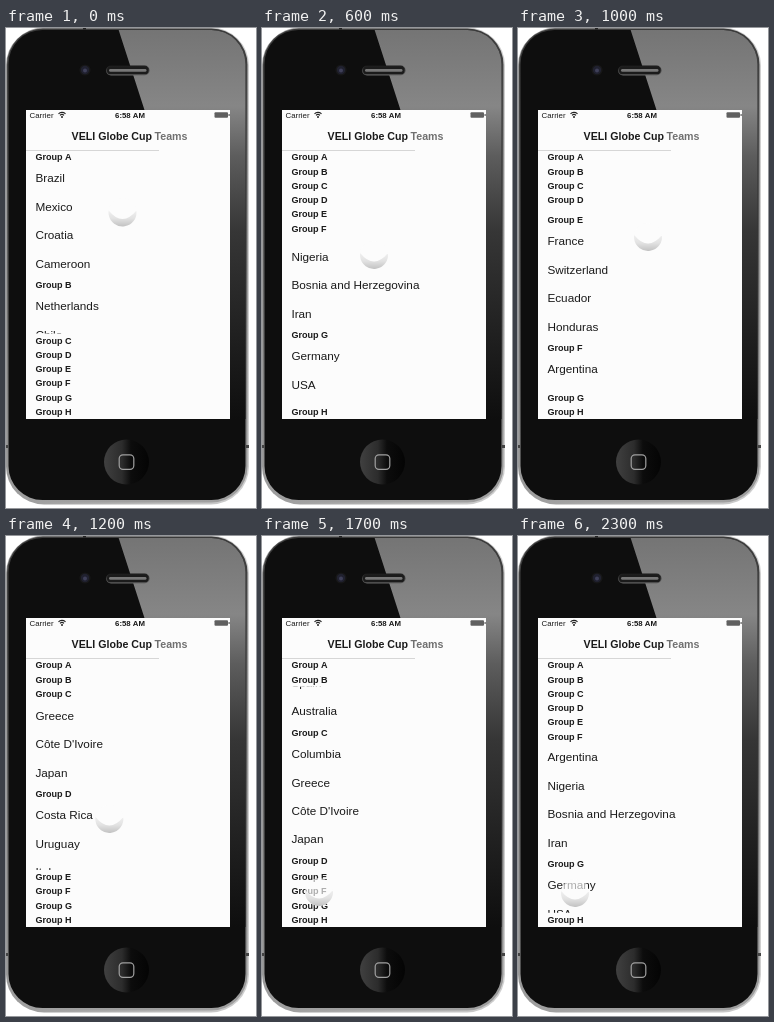
These frames come from a looping animation (250 px wide and 480 px high, 2400 ms). An HTML page with a canvas:

```html
<!DOCTYPE html>
<html lang="en">
<head>
<meta charset="utf-8">
<title>Sticky group list</title>
<style>
  html, body { margin: 0; width: 100%; height: 100%; overflow: hidden; background: #fff; }
  canvas { display: block; width: 250px; height: 480px; }
</style>
</head>
<body>
<canvas id="stage"></canvas>
<script>
const W = 250, H = 480, LOOP = 2400, STEP = 100;
const SCREEN = { x: 20, y: 82, w: 204, h: 309 };
const LIST_TOP = 122.3, HEAD = 14.25, ROW = 28.44, SECTION = 128;
const BOTTOM = SCREEN.y + SCREEN.h;
const PAPER = '#fcfcfc', INK = '#1a1a1a', BODY = '#0e0e0e';
const FONT = '"Liberation Sans", Arial, sans-serif';

const groups = [
  ['Brazil', 'Mexico', 'Croatia', 'Cameroon'],
  ['Netherlands', 'Chile', 'Spain', 'Australia'],
  ['Columbia', 'Greece', "Côte D'Ivoire", 'Japan'],
  ['Costa Rica', 'Uruguay', 'Italy', 'England'],
  ['France', 'Switzerland', 'Ecuador', 'Honduras'],
  ['Argentina', 'Nigeria', 'Bosnia and Herzegovina', 'Iran'],
  ['Germany', 'USA', 'Portugal', 'Ghana'],
  ['Belgium', 'Algeria', 'Russia', 'Korea Republic']
];

// [time, scroll offset]
const scrollKeys = [
  [0, 0], [100, 15], [200, 65], [300, 135], [400, 213.4], [500, 390], [600, 590],
  [700, 720], [800, 758], [900, 630], [1000, 449], [1100, 330], [1200, 255],
  [1300, 220], [1400, 205.4], [1700, 188.4], [1800, 200], [1900, 400],
  [2000, 545], [2100, 545], [2200, 563], [2300, 569]
];
// [time, x, y] of the touch dot
const touchKeys = [
  [0, 116.5, 184.5], [400, 99.5, 244.5], [800, 124.5, 209.5], [1000, 130, 209],
  [1300, 90, 320], [1400, 75, 353], [1700, 57, 356], [2300, 57, 357]
];
const presses = [[300, 600], [1800, 2000]];

const canvas = document.getElementById('stage');
const ratio = window.devicePixelRatio || 1;
canvas.width = W * ratio;
canvas.height = H * ratio;
const ctx = canvas.getContext('2d');
ctx.scale(ratio, ratio);

function sample(keys, t, col) {
  const next = keys.findIndex(k => k[0] > t);
  if (next < 0) return keys[keys.length - 1][col];
  const a = keys[next - 1], b = keys[next];
  return a[col] + (b[col] - a[col]) * (t - a[0]) / (b[0] - a[0]);
}

function gradient(x0, y0, x1, y1, stops) {
  const g = ctx.createLinearGradient(x0, y0, x1, y1);
  stops.forEach(([at, color]) => g.addColorStop(at, color));
  return g;
}

function rect(x, y, w, h, fill) {
  ctx.fillStyle = fill;
  ctx.fillRect(x, y, w, h);
}

function roundRect(x, y, w, h, r, fill) {
  ctx.beginPath();
  ctx.roundRect(x, y, w, h, r);
  if (fill) {
    ctx.fillStyle = fill;
    ctx.fill();
  }
}

function circle(x, y, r, fill) {
  ctx.beginPath();
  ctx.arc(x, y, r, 0, Math.PI * 2);
  ctx.fillStyle = fill;
  ctx.fill();
}

function text(str, x, y, size, weight = 'normal', color = INK, align = 'left') {
  ctx.font = `${weight} ${size}px ${FONT}`;
  ctx.textAlign = align;
  ctx.fillStyle = color;
  ctx.fillText(str, x, y);
}

function drawGloss() {
  ctx.save();
  roundRect(2.5, 2, 237, 470, 34);
  ctx.clip();
  ctx.beginPath();
  ctx.moveTo(112, 0);
  ctx.lineTo(138.5, 82);
  ctx.lineTo(224, 82);
  ctx.lineTo(224, 391);
  ctx.lineTo(241, 391);
  ctx.lineTo(241, 0);
  ctx.closePath();
  ctx.fillStyle = gradient(0, 0, 0, 391, [
    [0, '#747474'], [0.2, '#868686'], [0.33, '#5c5c5c'], [0.52, '#363636'], [1, BODY]
  ]);
  ctx.fill();
  ctx.restore();
}

function drawPhone() {
  rect(0, 0, W, H, '#fff');
  roundRect(0, -0.5, 243, 477, 38, gradient(0, 0, 243, 0, [
    [0, '#9a9a9a'], [0.5, '#b4b4b4'], [1, '#d0d0d0']
  ]));
  roundRect(1, 0.5, 240.5, 474, 36, gradient(0, 0, 0, 474, [
    [0, '#3a3a3a'], [0.5, '#606060'], [1, '#a0a0a0']
  ]));
  roundRect(2.5, 2, 237, 470, 34, BODY);
  rect(0, 417, 2, 3, '#444');
  rect(240, 417, 3, 3, '#444');
  rect(77, 0, 3, 1.5, '#222');
  drawGloss();

  circle(79, 42, 5.6, '#171717');
  circle(79, 42, 4.2, '#20212f');
  circle(79, 42.5, 2, '#3e3f58');

  roundRect(100, 37.5, 43.5, 10, 5, gradient(0, 37, 0, 48, [[0, '#161616'], [1, '#6a6a6a']]));
  roundRect(101, 38.5, 41.5, 7.8, 3.9, '#1b1b1b');
  roundRect(103, 41, 37.5, 2.8, 1.4, '#777');

  circle(120.5, 434, 22.5, gradient(98, 434, 143, 434, [
    [0, '#404040'], [0.4, '#2c2c2c'], [0.6, '#0c0c0c'], [1, '#040404']
  ]));
  roundRect(113.2, 426.8, 14.6, 14.6, 3.8);
  ctx.strokeStyle = '#a0a0a0';
  ctx.lineWidth = 1.2;
  ctx.stroke();
}

function drawStatusBar() {
  text('Carrier', 23.5, 90, 7.9);
  text('6:58 AM', 124, 90, 7.8, 'bold', INK, 'center');

  ctx.strokeStyle = '#222';
  ctx.lineWidth = 1.1;
  [2.7, 4.8].forEach(r => {
    ctx.beginPath();
    ctx.arc(56, 89.2, r, -Math.PI * 0.76, -Math.PI * 0.24);
    ctx.stroke();
  });
  circle(56, 89, 1, '#222');

  roundRect(208.5, 84.3, 13.5, 5.4, 1, '#606060');
  ctx.fillRect(222.5, 86, 1.2, 2);
}

function drawNavBar() {
  rect(SCREEN.x, SCREEN.y, SCREEN.w, 40, PAPER);
  drawStatusBar();
  text('VELI Globe Cup', 146, 111.6, 10.65, 'bold', INK, 'right');
  text('Teams', 148.5, 111.6, 10.65, 'bold', '#707070');
  rect(SCREEN.x, 122, 133, 1, '#d6d6d6');
}

function drawList(scroll) {
  const sectionTop = i => LIST_TOP + i * SECTION - scroll;
  // Headers stack at both ends of the list; rows show only between the stacks.
  const headers = groups.map((_, i) => {
    const highest = LIST_TOP + i * HEAD;
    const lowest = BOTTOM - (groups.length - i) * HEAD;
    return Math.min(Math.max(sectionTop(i), highest), lowest);
  });

  groups.forEach((teams, i) => {
    const top = headers[i] + HEAD;
    const end = i + 1 < groups.length ? headers[i + 1] : BOTTOM;
    if (end - top < 1) return;
    ctx.save();
    ctx.beginPath();
    ctx.rect(SCREEN.x, top, SCREEN.w, end - top);
    ctx.clip();
    teams.forEach((team, j) => {
      text(team, 29.4, sectionTop(i) + HEAD + (j + 0.5) * ROW + 3.7, 11.75);
    });
    ctx.restore();
  });

  headers.forEach((y, i) => {
    text('Group ' + 'ABCDEFGH'[i], 29.4, y + 10.1, 9.05, 'bold');
  });
}

function drawTouch(x, y, pressed) {
  const r = 14;
  if (pressed) {
    circle(x, y, r, gradient(x, y - r, x, y + r, [
      [0, 'rgba(190,190,190,.8)'], [0.5, 'rgba(208,208,208,.8)'], [1, 'rgba(175,175,175,.85)']
    ]));
    ctx.strokeStyle = 'rgba(150,150,150,.3)';
    ctx.lineWidth = 0.8;
    ctx.stroke();
    return;
  }
  circle(x, y, r, 'rgba(252,252,252,.65)');
  ctx.beginPath();
  ctx.arc(x, y, r, -0.15, Math.PI + 0.15);
  ctx.quadraticCurveTo(x, y + 15, x + r, y - 2);
  ctx.fillStyle = gradient(x, y - 2, x, y + r, [[0, '#f0f0f0'], [0.5, '#e2e2e2'], [1, '#c2c2c2']]);
  ctx.fill();
}

function draw(t) {
  drawPhone();
  ctx.save();
  ctx.beginPath();
  ctx.rect(SCREEN.x, SCREEN.y, SCREEN.w, SCREEN.h);
  ctx.clip();
  rect(SCREEN.x, SCREEN.y, SCREEN.w, SCREEN.h, PAPER);
  drawList(sample(scrollKeys, t, 1));
  drawNavBar();
  const pressed = presses.some(([from, to]) => t >= from && t < to);
  drawTouch(sample(touchKeys, t, 1), sample(touchKeys, t, 2), pressed);
  ctx.restore();
}

const start = performance.now();
function tick() {
  const t = (performance.now() - start) % LOOP;
  draw(Math.floor(t / STEP) * STEP);
  requestAnimationFrame(tick);
}
tick();
</script>
</body>
</html>
```
